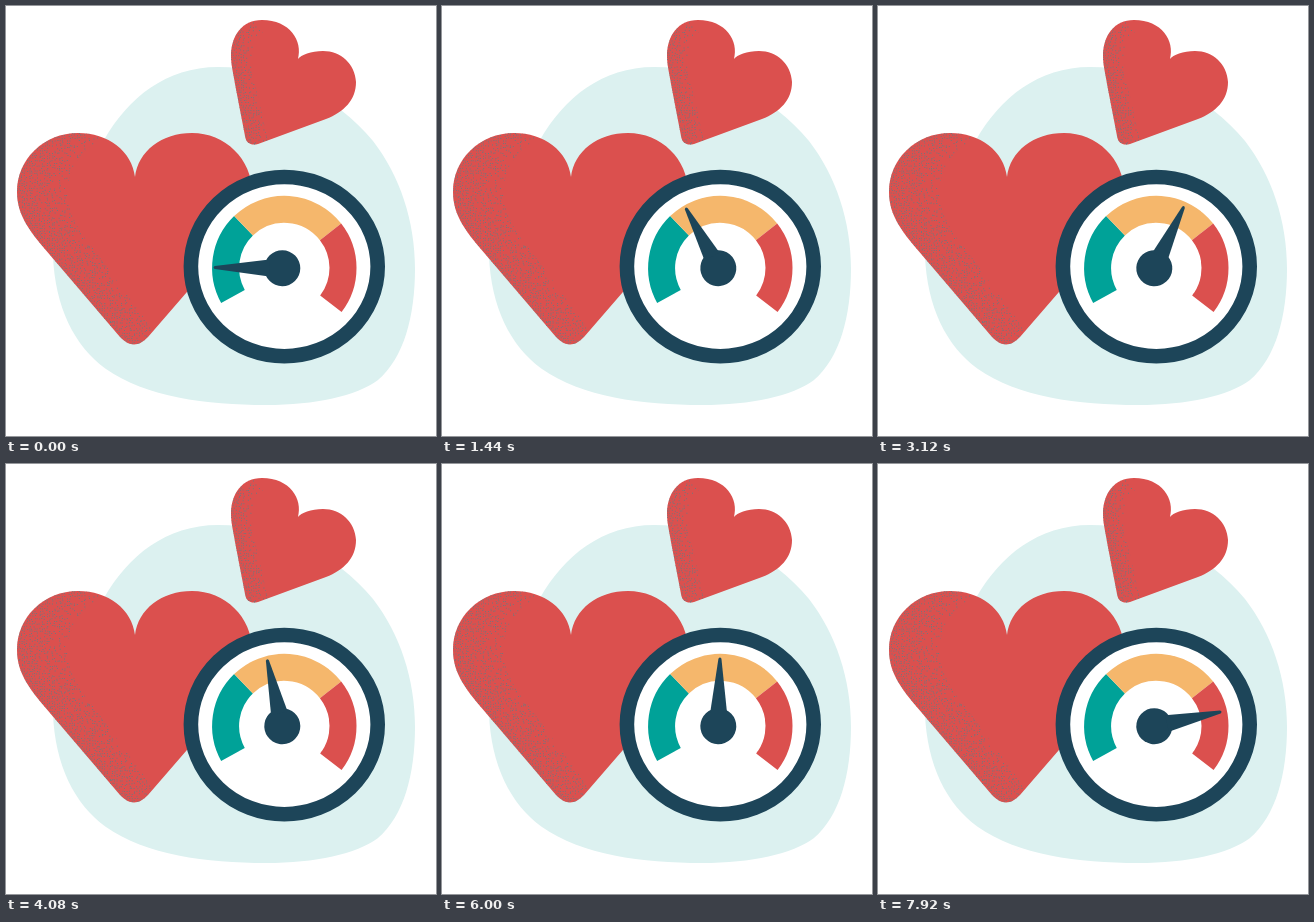
An HTML page for the animation above (8000 ms loop, 430 px wide and 430 px high).

```html
<!DOCTYPE html>
<html lang="en">
<head>
<meta charset="utf-8">
<title>Heart gauge</title>
<style>
  html, body { margin: 0; width: 100%; height: 100%; overflow: hidden; background: #fff; }
  svg { display: block; width: 100%; height: 100%; }
</style>
</head>
<body>
<svg viewBox="0 0 430 430">
  <defs>
    <path id="big" d="M129 171C126 145 102 127 72 127C38 127 11 153 11 186C11 210 25 226 38 242L114 331Q128 346 142 331L219 242C232 226 246 210 246 186C246 153 219 127 186 127C156 127 132 145 129 171Z"/>
    <path id="small" d="M292 53C297 35 284 14 256 14C236 14 225 30 225 50C225 60 228 70 229 78L239 130C240 137 245 140 252 138L320 113C338 106 350 94 350 76C349 58 335 45 317 45C305 45 295 49 292 53Z"/>
    <clipPath id="bigClip"><use href="#big"/></clipPath>
    <clipPath id="smallClip"><use href="#small"/></clipPath>
    <clipPath id="bigShade"><path d="M0 120H100V132C75 142 62 162 62 185C62 212 78 231 90 246L150 328V345H0Z"/></clipPath>
    <clipPath id="smallShade"><path d="M220 10H270V17C253 25 246 40 246 56C246 68 250 80 252 90L262 136V145H220Z"/></clipPath>
  </defs>

  <path fill="#dcf1f0" d="M212 61C160 61 122 92 98 134C72 170 47 205 47 250C49 300 68 340 100 363C140 391 200 399 260 399C310 399 350 390 372 374C398 352 409 310 409 263C409 215 394 170 367 135C330 90 272 61 212 61Z"/>

  <g fill="#db504e">
    <use href="#big"/>
    <use href="#small"/>
  </g>
  <g fill="#71777c">
    <g clip-path="url(#bigClip)"><path id="bigDots" clip-path="url(#bigShade)"/></g>
    <g clip-path="url(#smallClip)"><path id="smallDots" clip-path="url(#smallShade)"/></g>
  </g>

  <ellipse cx="278.3" cy="260.6" rx="93.4" ry="89.6" fill="#fff" stroke="#1d4559" stroke-width="14.6"/>
  <g id="bands" fill="none" stroke-width="27"></g>
  <g id="needle" fill="#1d4559">
    <circle r="18"/>
    <path d="M-8.5 -13L-1.5 -67.5Q0 -70 1.5 -67.5L8.5 -13Z"/>
  </g>
</svg>
<script>
const get = id => document.getElementById(id);

// Coloured bands; angles run clockwise from the top
const point = deg => {
  const a = deg * Math.PI / 180;
  return `${278.3 + 58.7 * Math.sin(a)} ${262 - 58.7 * Math.cos(a)}`;
};
const band = (from, to, color) =>
  `<path stroke="${color}" d="M${point(from)}A58.7 58.7 0 0 1 ${point(to)}"/>`;
get('bands').innerHTML =
  band(-119, -44, '#00a298') + band(-44, 52, '#f5b76c') + band(52, 127.5, '#db504e');

// Grainy shading that thins out away from the left edge
let seed = 7;
const random = () => (seed = seed * 16807 % 2147483647) / 2147483647;

function stipple(id, x0, y0, x1, y1, edge, width) {
  let d = '';
  for (let y = y0; y < y1; y += 2.5) {
    for (let x = x0; x < x1; x += 2.5) {
      const px = x + random() * 1.5, py = y + random() * 1.5;
      const depth = (px - edge(py)) / width;
      if (random() < 0.95 - 0.65 * depth) {
        d += `M${px.toFixed(1)} ${py.toFixed(1)}h1v1h-1z`;
      }
    }
  }
  get(id).setAttribute('d', d);
}
stipple('bigDots', 10, 126, 152, 342,
  y => y < 205 ? 72 - Math.sqrt(61 ** 2 - (188 - y) ** 2 + 1000) + 8 : 14 + (y - 205) * 0.79, 52);
stipple('smallDots', 224, 13, 270, 141, y => 225 + Math.max(0, y - 55) * 0.18, 24);

// Needle swings at constant speed between these [ms, degrees]
const swing = [[0, -89.5], [2910, 34], [4860, -44], [8000, 81]];

function angleAt(t) {
  const i = swing.findIndex(([end]) => t < end);
  const [t0, a0] = swing[i - 1], [t1, a1] = swing[i];
  return a0 + (a1 - a0) * (t - t0) / (t1 - t0);
}

function draw(now) {
  const t = Math.floor(now % 8000 / 80) * 80;
  get('needle').setAttribute('transform', `translate(276.3 262.2) rotate(${angleAt(t)})`);
  requestAnimationFrame(draw);
}
draw(0);
</script>
</body>
</html>
```
